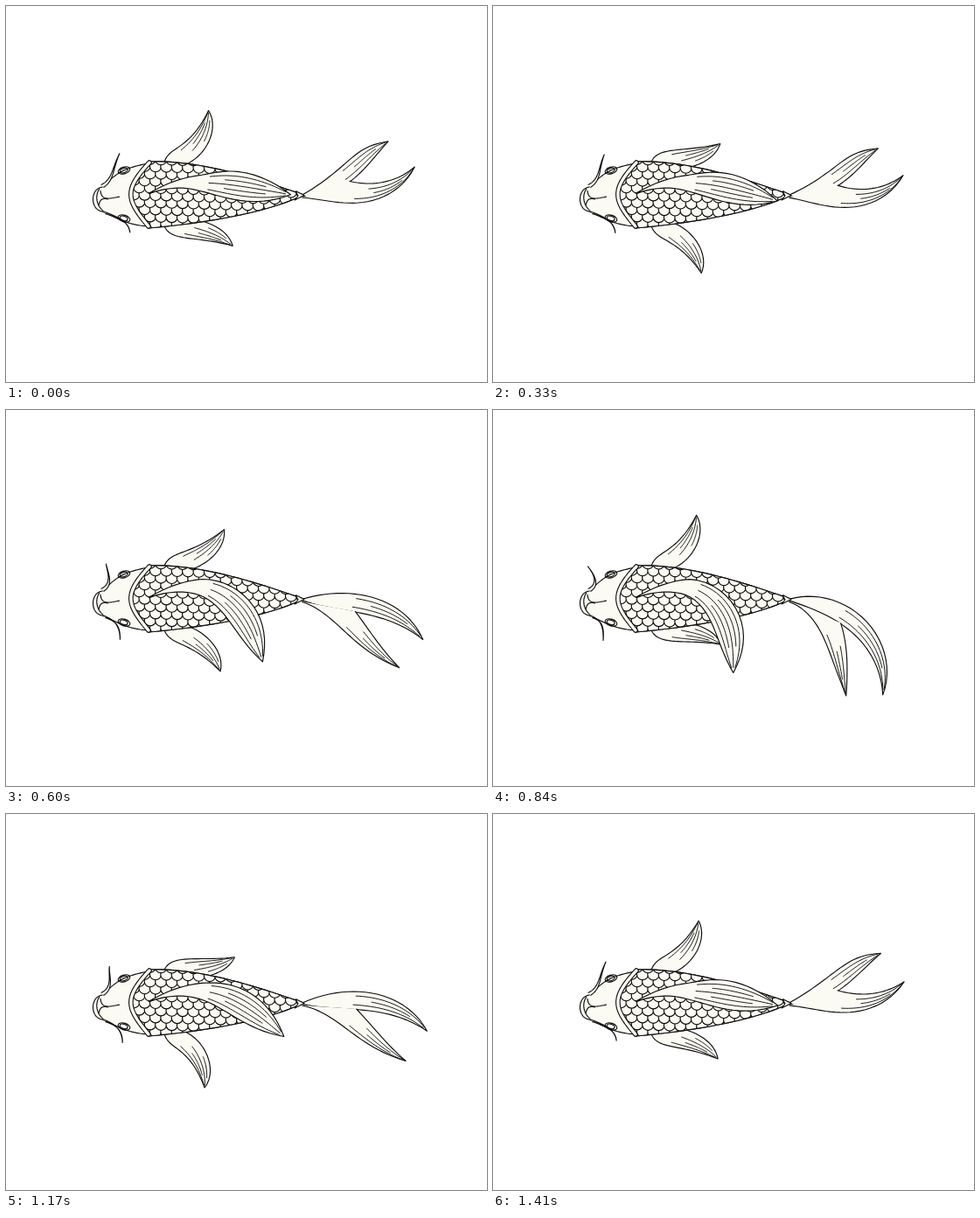
These frames come from a looping animation (550 px wide and 430 px high, 1440 ms). An HTML page with a canvas:

```html
<!DOCTYPE html>
<html lang="en">
<head>
<meta charset="utf-8">
<title>Swimming koi</title>
<style>
  html, body { margin: 0; width: 100%; height: 100%; overflow: hidden; background: #fff; }
  canvas { display: block; width: 550px; height: 430px; }
</style>
</head>
<body>
<canvas id="stage"></canvas>
<script>
const W = 550, H = 430, LOOP = 1440, STEP = 30;
const INK = '#0c0c0c', CREAM = '#fcfbf3', LINE = 1.15;
const canvas = document.getElementById('stage');
const ctx = canvas.getContext('2d');
const dpr = window.devicePixelRatio || 1;
canvas.width = W * dpr;
canvas.height = H * dpr;

const wave = (t, peak, period = LOOP) => Math.cos((t - peak) / period * 2 * Math.PI);
const rad = Math.PI / 180;
const linear = u => u;
const easeOut = u => 1 - (1 - u) * (1 - u);
const mix = (a, b, f) => a.map((v, i) => v + (b[i] - v) * f);

// Point on a cubic curve given by four control points.
function cubic(p, u) {
  const v = 1 - u;
  const part = i => v * v * v * p[0][i] + 3 * u * v * v * p[1][i] + 3 * u * u * v * p[2][i] + u * u * u * p[3][i];
  return [part(0), part(1)];
}

function sample(p, from = 0, to = 1, count = 24) {
  return Array.from({ length: count + 1 }, (_, i) => cubic(p, from + (to - from) * i / count));
}

function trace(points) {
  ctx.beginPath();
  points.forEach(p => ctx.lineTo(...p));
}

function line(points) {
  trace(points);
  ctx.stroke();
}

function shape(points) {
  trace(points);
  ctx.fillStyle = CREAM;
  ctx.fill();
  ctx.stroke();
}

// Curls the local x axis: its heading runs from `turn` to `turn + bend` degrees.
function curl(x0, y0, length, turn, bend, ease, flip = 1) {
  const heading = s => (turn + bend * ease(Math.max(0, s) / length)) * rad;
  return ([s, off]) => {
    const parts = 12, d = s / parts;
    let x = 0, y = 0;
    for (let i = 0; i < parts; i++) {
      const h = heading((i + .5) * d);
      x += Math.cos(h) * d;
      y += Math.sin(h) * d;
    }
    const h = heading(s);
    return [x0 + x - Math.sin(h) * off, y0 + flip * (y + Math.cos(h) * off)];
  };
}

// A lobe lies between two curves that meet at the tip; its rays blend them.
function drawLobe({ upper, lower, rays }, warp) {
  shape([...sample(upper), ...sample(lower).reverse()].map(warp));
  ctx.lineWidth = .95;
  for (let i = 1; i <= rays; i++) {
    const short = i % 2 ? 0 : .13;
    const ray = upper.map((p, k) => mix(p, lower[k], i / (rays + 1)));
    line(sample(ray, .4 + short, .97 - short).map(warp));
  }
  ctx.lineWidth = LINE;
}

const sideFin = {
  upper: [[0, 1], [10, -20], [42, -3], [83, 0]],
  lower: [[8, 8], [38, 19], [70, 18], [83, 0]],
  rays: 4
};
const dorsalFin = {
  upper: [[-46, 25], [-5, -32], [60, -54], [112, 0]],
  lower: [[-46, 25], [12, -27], [45, 16], [112, 0]],
  rays: 5
};
const tailTop = {
  upper: [[2, -2], [40, -36], [92, -62], [138, -37]],
  lower: [[2, 0], [50, -6], [85, -36], [138, -37]],
  rays: 3
};
const tailLow = {
  upper: [[60, -18], [85, -8], [108, 2], [138, 5]],
  lower: [[2, 1.5], [45, -4], [80, 24], [138, 5]],
  rays: 3
};

const back = sample([[162, 178], [220, 176], [280, 195], [340, 216]]);
const belly = sample([[340, 216], [300, 236], [230, 248], [163, 254]]);
const gill = sample([[164, 179], [134, 211], [138, 222], [163, 252]]);

function drawBody() {
  const r = 6.6, rowGap = 8.2;
  ctx.save();
  shape([...back, ...belly, ...gill.slice().reverse()]);
  ctx.clip();
  // Each row of scales overlaps the one below it.
  for (let row = 10; row >= -2; row--) {
    for (let col = 0; col < 17; col++) {
      const dx = (col + (row & 1) / 2) * 12.4;
      ctx.beginPath();
      ctx.arc(140 + dx, 174 + row * rowGap + dx * .03, r, 0, 2 * Math.PI);
      ctx.fill();
      ctx.stroke();
    }
  }
  ctx.restore();
  line(back);
  line(belly);
  shape([[331, 211.5], [341, 216.5], [330, 222], [334, 217], [331, 211.5]]);
}

function whisker(path) {
  const points = sample(path);
  const side = k => points.map(([x, y], i) => {
    const taper = 1 - i / (points.length - 1);
    return [x + k * taper, y + k * taper];
  });
  shape([...side(-1.4), ...side(1.4).reverse()]);
}

function drawEye(y, flip) {
  ctx.save();
  ctx.translate(135, y);
  ctx.scale(1, flip);
  ctx.rotate(-.3);
  for (const size of [1, .65]) {
    ctx.beginPath();
    ctx.ellipse(size - 1, 0, 7 * size, 3.8 * size, 0, 0, 2 * Math.PI);
    ctx.stroke();
  }
  ctx.restore();
}

function drawHead(sway) {
  const brow = sample([[162, 180], [135, 186], [130, 188], [110, 207]]);
  const chin = sample([[110, 235], [128, 243], [138, 250], [162, 252]]);
  const lips = sample([[110, 207], [96, 209], [96, 233], [110, 235]]);
  shape([...brow, ...lips, ...chin, ...gill.slice().reverse()]);

  line(sample([[107, 209], [101, 217], [104, 229], [111, 234]]));
  line(sample([[108, 211], [109, 222], [116, 221], [130, 218]]));
  line(sample([[106, 228], [108, 219], [112, 220], [117, 221]]));
  drawEye(188, 1);
  drawEye(243, -1);

  whisker([[110, 206], [123, 199], [118 + 4 * sway, 186], [120 + 11.5 * sway, 173.5 - 5.5 * sway]]);
  whisker([[112, 236], [122, 240], [134 + 7 * sway, 244], [134.5 + 8.5 * sway, 261 - 2.5 * sway]]);

  // Gill cover: a cream band between two lines.
  ctx.lineCap = 'round';
  for (const [width, color] of [[5.6, INK], [3.4, CREAM]]) {
    ctx.lineWidth = width;
    ctx.strokeStyle = color;
    line(gill);
  }
}

function draw(t) {
  ctx.setTransform(dpr, 0, 0, dpr, 0, 0);
  ctx.fillStyle = '#fff';
  ctx.fillRect(0, 0, W, H);
  ctx.strokeStyle = INK;
  ctx.lineWidth = LINE;
  ctx.lineJoin = 'round';
  ctx.lineCap = 'butt';

  // The side fins beat twice per swing of the tail.
  const beat = LOOP / 2;
  const topBend = -30 - 31 * wave(t, 55, beat);
  const lowBend = -32 + 31 * wave(t, 85, beat);
  const tailTurn = 20 + 6 * wave(t, 720);
  const tailBend = -7 + 72 * wave(t, 890);
  const dorsalBend = 3 + 43.5 * wave(t, 815) + 6 * wave(t, 0, beat);

  drawLobe(sideFin, curl(180, 180, 83, -11, topBend, easeOut));
  drawLobe(sideFin, curl(180, 250, 83, -11, lowBend, easeOut, -1));
  const tail = curl(337, 217, 138, tailTurn, tailBend, linear);
  drawLobe(tailTop, tail);
  drawLobe(tailLow, tail);
  drawBody();
  drawLobe(dorsalFin, curl(215, 210, 112, 23.6, dorsalBend, easeOut));
  drawHead(wave(t, 125));
}

function frame() {
  draw(Math.floor(performance.now() / STEP) * STEP % LOOP);
  requestAnimationFrame(frame);
}
frame();
</script>
</body>
</html>
```
